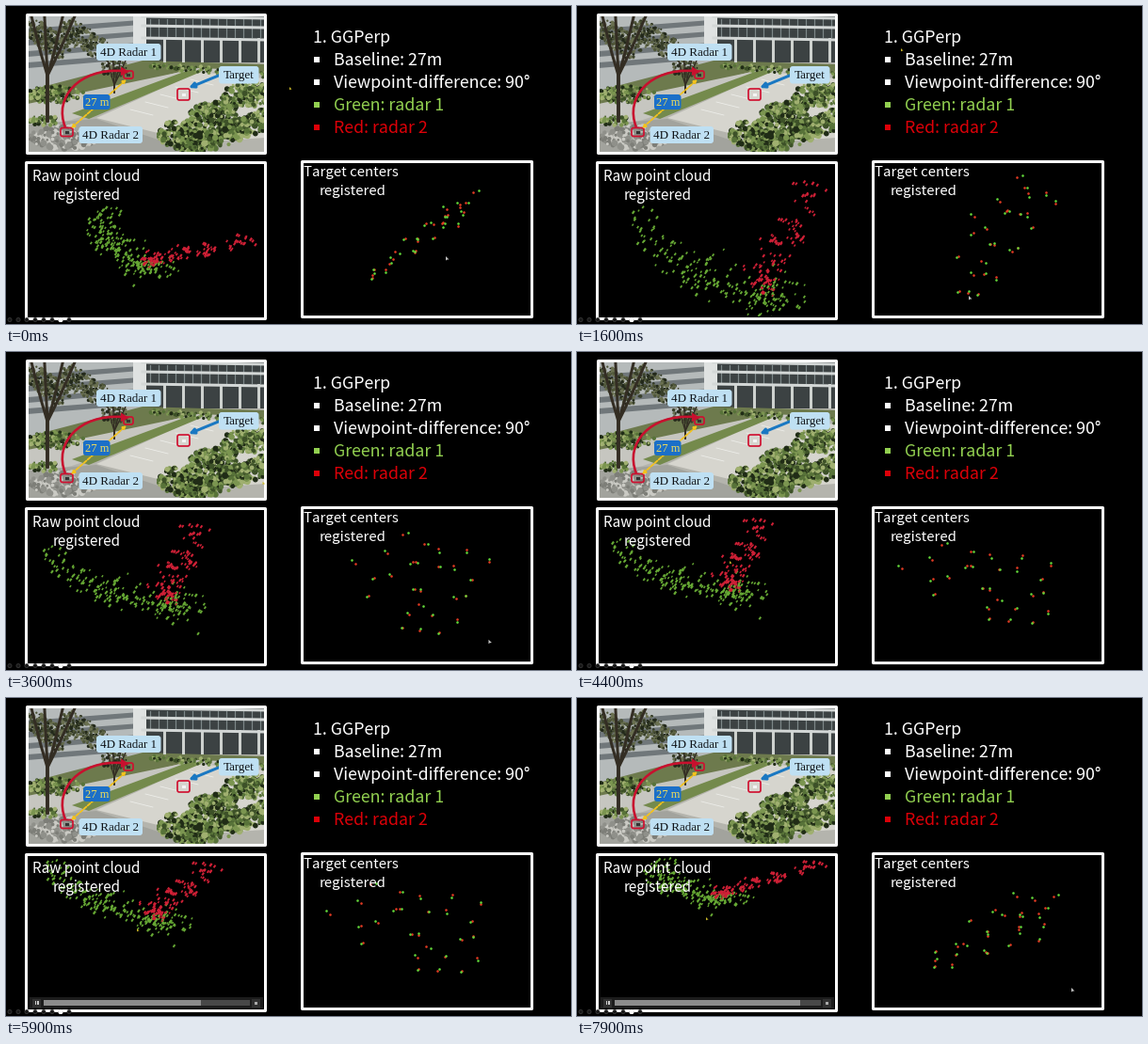
Animation, 600 px wide and 338 px high, one loop 8 s. Source, as a matplotlib script:

```python
import numpy as np
import matplotlib.pyplot as plt
from matplotlib.animation import FuncAnimation
from matplotlib.markers import MarkerStyle
from matplotlib.patches import (Circle, FancyArrowPatch, FancyBboxPatch,
                                PathPatch, Polygon, Rectangle)
from matplotlib.path import Path
from matplotlib.transforms import Affine2D

W, H, FRAMES, PX = 600, 338, 80, 0.72
KEYS = np.array([0, 16, 27, 44, 59, 70, 79])
SANS = ["Noto Sans CJK JP", "Liberation Sans"]
rng = np.random.default_rng(12)

fig = plt.figure(figsize=(W / 100, H / 100), dpi=100, facecolor="black")
ax = fig.add_axes([0, 0, 1, 1])
ax.set_xlim(0, W)
ax.set_ylim(H, 0)
ax.axis("off")


def text(x, y, s, px, color="white", family=SANS, ha="left", z=20):
    ax.text(x, y, s, fontsize=px * PX, color=color, family=family, ha=ha,
            va="baseline", zorder=z)


def rect(x0, y0, x1, y1, z=1, **kw):
    return ax.add_patch(Rectangle((x0, y0), x1 - x0, y1 - y0, zorder=z, **kw))


def frame(x0, y0, x1, y1):
    rect(x0, y0, x1, y1, z=15, fill=False, ec="white", lw=3 * PX,
         joinstyle="round")


def box(x0, y0, x1, y1, r=3, z=10, **kw):
    ax.add_patch(FancyBboxPatch((x0, y0), x1 - x0, y1 - y0, zorder=z,
                                boxstyle=f"round,pad=0,rounding_size={r}",
                                **kw))


# ---- site photo -------------------------------------------------------
photo = rect(23, 10, 275, 155, fc="#b4b4ad", lw=0)
LEAF = ["#23291b", "#39402a", "#4f5639", "#6a7050"]
BUSH = ["#202c16", "#3d5128", "#587339", "#7b9550", "#a0b070"]


def poly(color, *pts, z=2):
    ax.add_patch(Polygon(pts, fc=color, lw=0, zorder=z)).set_clip_path(photo)


def stroke(color, px, *pts, z=3):
    line, = ax.plot(*np.transpose(pts), color=color, lw=px * PX, zorder=z)
    line.set_clip_path(photo)


def leaves(cx, cy, rx, ry, colors, size=3.5, z=5):
    n = int(rx * ry * 0.5)
    a, r = rng.uniform(0, 2 * np.pi, n), np.sqrt(rng.random(n))
    s = (size * PX * rng.uniform(0.5, 1.4, n)) ** 2
    ax.scatter(cx + rx * r * np.cos(a), cy + ry * r * np.sin(a), s=s,
               c=rng.choice(colors, n), lw=0, zorder=z).set_clip_path(photo)


poly("#b5baba", (23, 10), (145, 10), (145, 60), (23, 92))
for y in range(24, 66, 12):
    poly("#70777a", (23, y), (142, y - 9), (142, y - 4), (23, y + 6))
rect(145, 10, 275, 60, z=2, fc="#3c4243", lw=0)
for x in range(153, 275, 9):
    stroke("#7d8788", 1.2, (x, 14), (x, 33))
for x in range(168, 275, 20):
    stroke("#cdd1ce", 3, (x, 35), (x, 58))
for y in (11, 21, 34):
    stroke("#d3d7d6", 3, (145, y), (275, y + 2))
poly("#dfe2e1", (135, 10), (149, 10), (149, 52), (135, 54))
poly("#6d7a4d", (23, 90), (145, 58), (275, 62), (275, 72), (200, 66),
     (23, 112))
poly("#c6c6c0", (23, 104), (205, 66), (230, 67), (70, 121), (23, 132))
poly("#748a4c", (70, 114), (197, 67), (207, 70), (88, 120), z=3)
poly("#d6d5ce", (96, 119), (205, 70), (275, 77), (275, 140), (202, 145))
for k in range(5):
    x, y = 132 + 16 * k, 110 - 8 * k
    stroke("#eeeeea", 0.8, (x, y), (x + 24, y + 6))
poly("#a2a39d", (23, 126), (96, 120), (200, 155), (23, 155))
leaves(60, 140, 36, 12, ["#7d7e78", "#8f908a", "#cacac4"], 5, 3)

for k in range(6):
    leaves(30 + 13 * k, 26 + 9 * (k % 3), 14, 12, LEAF, 3)
    leaves(165 + 22 * k, 64 + 2 * k, 12, 4, BUSH, 3)
leaves(115, 66, 14, 12, LEAF, 3)
leaves(52, 94, 32, 9, BUSH)
leaves(40, 122, 16, 6, BUSH)
for x in (44, 115):
    s = 1 if x < 100 else 0.45
    for dx, dy in ((-18, -85), (-4, -100), (16, -80), (32, -88)):
        stroke("#332d23", 3 * s, (x, 92 + 30 * (x < 100)), (x, 92 - 18 * s),
               (x + dx * s * 0.4, 92 + dy * s * 0.5),
               (x + dx * s, 92 + dy * s), z=6)
for k in range(6):
    leaves(178 + 17 * k, 136 - 10 * k + 8 * (k % 2), 17, 13, BUSH, 4.5)
    leaves(196 + 16 * k, 150 - 6 * k, 16, 11, BUSH, 5)


def label(x0, y0, x1, y1, s, px=13, fc="#bfe0f3", color="#101418"):
    box(x0, y0, x1, y1, fc=fc, lw=0)
    text((x0 + x1) / 2, (y0 + y1) / 2 + px * 0.32, s, px, color,
         "Liberation Serif", "center", 11)


def arrow(a, b, style, color, px, scale, **kw):
    ax.add_patch(FancyArrowPatch(a, b, arrowstyle=style, color=color,
                                 lw=px * PX, mutation_scale=scale, shrinkA=0,
                                 shrinkB=0, zorder=9, **kw))


for cx, cy, w, h in ((130, 73, 5, 4), (64.5, 134, 6.5, 4.5),
                     (188.5, 94, 6.5, 6)):
    box(cx - w, cy - h, cx + w, cy + h, 2, 8, fill=False, ec="#cf1030",
        lw=1.7 * PX)
    rect(cx - 2, cy - 1.5, cx + 2, cy + 2, z=8, lw=0,
         fc="#f4f4f4" if cx > 150 else "#333333")
curve = Path([(63, 129), (50, 97), (78, 66), (123, 69)],
             [Path.MOVETO] + [Path.CURVE4] * 3)
ax.add_patch(PathPatch(curve, fill=False, ec="#c8102e", lw=2.6 * PX, zorder=9))
poly("#c8102e", (122, 64.5), (131, 70), (122, 74), z=9)
arrow((69, 130), (128, 78), "<|-|>", "#f3c21c", 1.8, 5,
      linestyle=(0, (2, 1)))
arrow((228, 73), (194, 87), "-|>", "#1a78c2", 3, 8)
label(96, 40, 164.5, 58, "4D Radar 1")
label(77.5, 128, 145, 146, "4D Radar 2")
label(226, 64, 268.5, 82.5, "Target")
label(82, 94, 110.5, 110, "27 m", 12.5, "#1b6fc8", "#f0dc5a")

# ---- slide text and frames --------------------------------------------
frame(21.8, 8.7, 275.3, 155.5)
frame(20.8, 166, 275, 331.5)
frame(313.7, 164.7, 558, 329.5)

text(326, 39, "1. GGPerp", 17.8)
for i, (s, c) in enumerate((("Baseline: 27m", "white"),
                            ("Viewpoint-difference: 90°", "white"),
                            ("Green: radar 1", "#92d050"),
                            ("Red: radar 2", "#dc0008"))):
    y = 63 + 24 * i
    rect(327, y - 9.5, 333, y - 3.5, z=20, fc=c, lw=0)
    text(348, y, s, 17.8, c)
text(28, 185.5, "Raw point cloud", 15.2)
text(50, 206, "registered", 15.2)
text(316, 180.5, "Target centers", 15)
text(333, 201, "registered", 15)

for k in range(8):
    ax.add_patch(Circle((4 + 9 * k, 333.5), 2.1, fc="#181818", ec="#444444",
                        lw=0.6 * PX, zorder=16))
box(55.5, 331, 60.5, 336, 2, 17, fc="white", lw=0)


# ---- moving points ----------------------------------------------------
def blend(f, vals):
    """Piecewise linear value at time f between the key times."""
    i = min(np.searchsorted(KEYS, f, side="right"), len(KEYS) - 1)
    k = (f - KEYS[i - 1]) / (KEYS[i] - KEYS[i - 1])
    return vals[i - 1] * (1 - k) + vals[i] * k


def project(f, view, ground):
    """Place ground points in the view's origin and two axis ends."""
    o, a, b = blend(f, view)
    return o + ground @ np.array([a - o, b - o])


# per key time: origin, end of first axis, end of second axis
CLOUD_VIEW = np.array([
    [(150, 278), (98, 213), (268, 245)],
    [(207, 310), (50, 222), (252, 178)],
    [(190, 285), (35, 222), (212, 183)],
    [(172, 256), (30, 205), (195, 172)],
    [(165, 238), (35, 175), (220, 172)],
    [(155, 225), (78, 172), (275, 170)],
    [(152, 214), (78, 172), (265, 172)]])
TARGET_VIEW = np.array([
    [(441, 246), (457, 219), (491, 209)],
    [(447, 248), (417, 228), (479, 193)],
    [(447, 250), (398, 223), (478, 195)],
    [(440, 248), (350, 232), (423, 212)],
    [(440, 247), (349, 232), (423, 206)],
    [(441, 250), (456, 227), (500, 225)],
    [(441, 250), (456, 213), (500, 224)]])

# green spreads along the first axis with a bend, red along the second
n = 210
along = np.where(rng.random(n) < 0.35, rng.normal(0, 0.09, n),
                 rng.beta(1.8, 1.5, n))
green_pts = np.column_stack(
    [along, rng.normal(0, 0.09, n) - 0.12 * np.sin(np.pi * along)])
n = 120
along = rng.beta(0.9, 1.5, n) * 1.05
red_pts = np.column_stack(
    [rng.normal(0, 0.05, n) + 0.08 * (along < 0.45), along])

# targets stand on a jittered lattice that narrows at both ends
lattice = []
for b in np.linspace(-1, 1, 5):
    lo, hi = -0.6 - 0.25 * b, 1 - 0.75 * abs(b)
    lattice += [(a, b) for a in np.linspace(lo, hi, round((hi - lo) / 0.22))]
sites = np.array(lattice) + rng.normal(0, 0.08, (len(lattice), 2))
gap = rng.normal(0, 1.8, sites.shape)

pane = rect(23, 168, 274, 330, fc="none", lw=0)
streak = MarkerStyle("s", transform=Affine2D().scale(0.75, 1.25)
                     .rotate_deg(-35))


def cloud(pts, color):
    s = (rng.uniform(1.7, 3.1, len(pts)) * PX) ** 2
    dots = ax.scatter(*pts.T, s=s, c=color, marker=streak, lw=0, zorder=6)
    dots.set_clip_path(pane)
    return dots


green_cloud = cloud(green_pts, "#66a834")
red_cloud = cloud(red_pts, "#cf2036")
red_dots = ax.scatter([], [], s=(2.6 * PX) ** 2, c="#e23a22", lw=0, zorder=6)
green_dots = ax.scatter([], [], s=(2.6 * PX) ** 2, c="#62d83a", lw=0, zorder=7)

# ---- pointers and player bar ------------------------------------------
TIP = np.array([(0, 0), (0, 4.6), (1.2, 3.6), (3.4, 3.4)])
pen = ax.add_patch(Polygon(TIP, fc="#cdbb28", lw=0, zorder=25))
mouse = ax.add_patch(Polygon(TIP, fc="#c4c4c4", lw=0, zorder=25))
PEN = np.array([(301, 86), (344, 45), (397, 43), (162, 222), (139, 245),
                (303, 246), (137, 233)])
MOUSE = np.array([(467, 266), (416, 308), (468, 312), (552, 300), (552, 300),
                  (517, 295), (525, 308)])

played = rect(40, 321, 207, 327, z=14, fc="#8c8c8c", lw=0)
bar = [played,
       rect(25, 318, 273, 330, z=12, fc="#1c1c1c", lw=0),
       rect(40, 321, 259, 327, z=13, fc="#484848", lw=0),
       rect(264, 322.5, 267, 325.5, z=14, fc="#aaaaaa", lw=0)]
bar += [rect(x, 319.5, x + 9, 328.5, z=13, fc="#303030", lw=0)
        for x in (28, 261)]
bar += [rect(x, 322, x + 1.3, 326, z=14, fc="#cccccc", lw=0)
        for x in (31, 33.2)]


def update(f):
    green_cloud.set_offsets(project(f, CLOUD_VIEW, green_pts))
    red_cloud.set_offsets(project(f, CLOUD_VIEW, red_pts))
    p = project(f, TARGET_VIEW, sites)
    green_dots.set_offsets(p)
    red_dots.set_offsets(p + gap)
    pen.set_xy(TIP * 0.75 + blend(f, PEN))
    mouse.set_xy(TIP + blend(f, MOUSE))
    mouse.set_visible(f < 37 or f >= 64)
    shown = 56 <= f < 66 or f >= 74
    for part in bar:
        part.set_visible(shown)
    played.set_width(167 + 1.5 * (f - 59))
    return []


anim = FuncAnimation(fig, update, frames=FRAMES, interval=100, repeat=True,
                     repeat_delay=0, blit=False)
plt.show()
```
